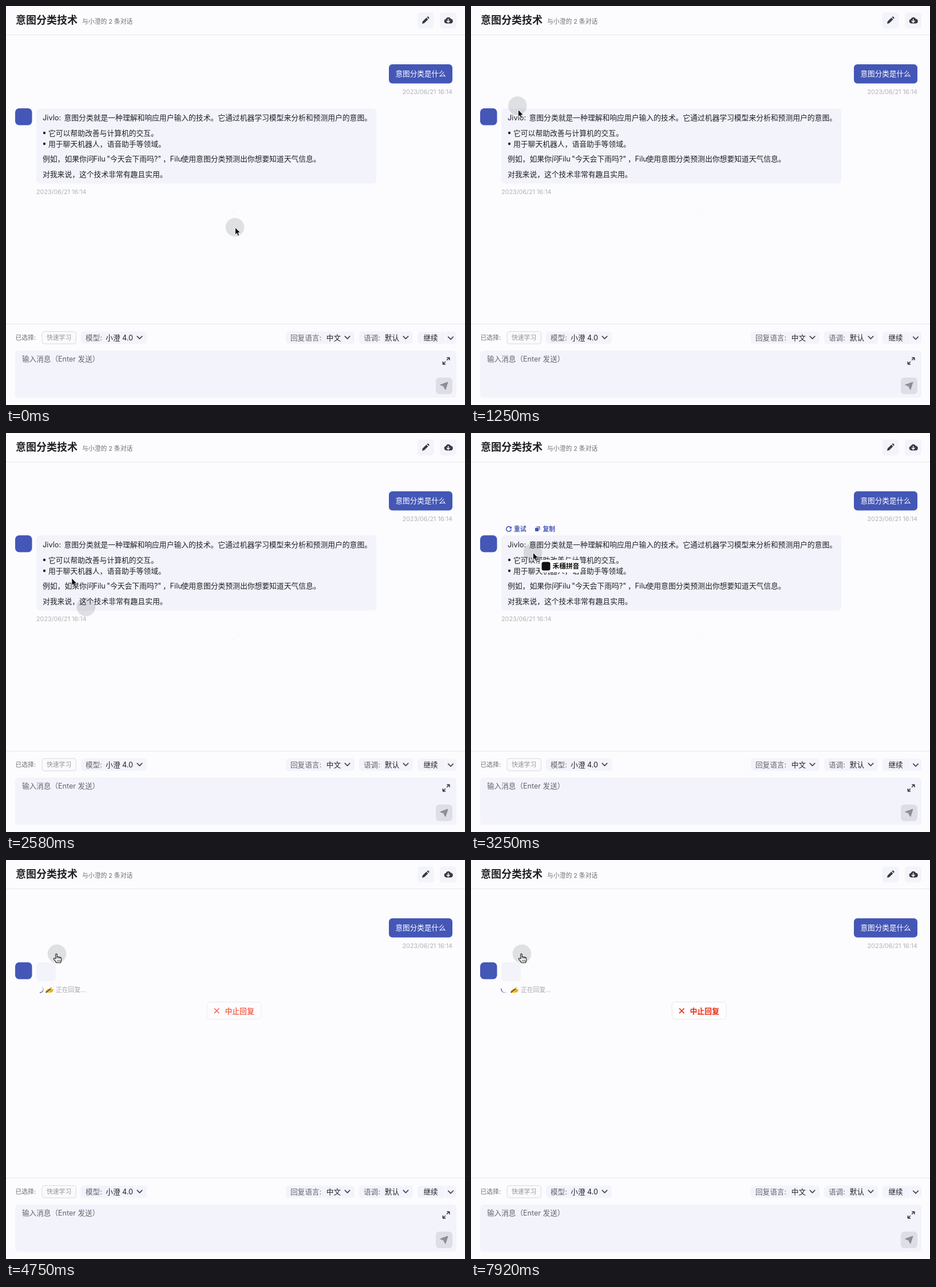
An HTML page for the animation above (8000 ms loop, 802 by 698 pixels).

```html
<!DOCTYPE html>
<html lang="zh-CN">
<head>
<meta charset="utf-8">
<title>对话</title>
<style>
html, body { margin: 0; width: 100%; height: 100%; overflow: hidden; background: #fcfcfe; }
svg { display: block; width: 100%; height: 100%; }
text { font: 12.6px Inter, "Noto Sans CJK SC", "Noto Sans CJK", sans-serif; fill: #1f2126; white-space: pre; }
.body { font-size: 12.8px; }
.small { font-size: 10.8px; fill: #6f7076; }
.date { fill: #b2b3b7; }
.label { fill: #64666c; }
.tool { font-weight: 600; fill: #4457b6; }
.soft { fill: #f3f3fb; }
.blue { fill: #4457b6; }
.line { fill: none; stroke-linecap: round; stroke-linejoin: round; }
</style>
</head>
<body>
<svg id="stage" viewBox="0 0 802 698">
  <defs>
    <path id="chevron" class="line" d="M-4.2 -2.2 0 2.2 4.2 -2.2" stroke="#4b4d53" stroke-width="1.8"/>
  </defs>

  <g id="header">
    <text x="17" y="31" style="font-size:18px;font-weight:600">意图分类技术</text>
    <text class="small" x="133" y="30.5">与小澄的 2 条对话</text>
    <rect class="soft" x="718.5" y="11" width="29" height="28.5" rx="6"/>
    <rect class="soft" x="758" y="11" width="29" height="28.5" rx="6"/>
    <path d="M727 31l.9-3.9 6.6-6.6 3 3-6.6 6.6zM735.4 19.6l.9-.9q.8-.7 1.6 0l1.4 1.4q.7.8 0 1.6l-.9.9z" fill="#36383e"/>
    <path d="M769.5 30.5h-.2a3.9 3.9 0 0 1-.5-7.7 4.3 4.3 0 0 1 8.2-.2 3.9 3.9 0 0 1-.4 7.9z" fill="#36383e"/>
    <path d="M772.7 23v5M770.3 26.2l2.4 2.4 2.4-2.4" class="line" stroke="#f3f3fb" stroke-width="1.5"/>
    <path d="M0 50.5H802M0 556.5H802" stroke="#e7e7ee"/>
  </g>

  <g id="question">
    <rect class="blue" x="669" y="102" width="111" height="33.5" rx="6"/>
    <text x="680.5" y="123" style="fill:#fff">意图分类是什么</text>
    <text class="small date" x="780" y="153.5" text-anchor="end">2023/06/21 16:14</text>
  </g>

  <rect class="blue" x="16" y="179" width="29.5" height="29.5" rx="7"/>

  <g id="answer">
    <rect class="soft" x="53" y="179" width="594" height="131.5" rx="6"/>
    <text class="body" x="64" y="200">Jivlo:<tspan x="101.5">意图分类就是一种理解和响应用户输入的技术。它通过机器学习模型来分析和预测用户的意图。</tspan></text>
    <circle cx="67" cy="222" r="2.2" fill="#1f2126"/>
    <text class="body" x="74" y="226.5">它可以帮助改善与计算机的交互。</text>
    <circle cx="67" cy="241" r="2.2" fill="#1f2126"/>
    <text class="body" x="74" y="245.5">用于聊天机器人，语音助手等领域。</text>
    <text class="body" x="64" y="272">例如，如果你问<tspan x="152.5">Filu</tspan><tspan x="176">"今天会下雨吗?"</tspan><tspan x="274">，</tspan><tspan x="286.5">Filu</tspan><tspan x="306.5">使用意图分类预测出你想要知道天气信息。</tspan></text>
    <text class="body" x="64" y="298.5">对我来说，这个技术非常有趣且实用。</text>
    <text class="small date" x="53" y="329">2023/06/21 16:14</text>
    <path d="M395 361.5h5" stroke="#f0f0f3"/>
  </g>

  <g id="tools">
    <path class="line" d="M69.6 165.6a4.3 4.3 0 1 0 .5 3.6" stroke="#4457b6" stroke-width="1.6"/>
    <path class="blue" d="M71 163.2v4h-4z"/>
    <text class="small tool" x="75" y="172">重试</text>
    <path class="blue" d="M114.5 163.5h6v6h-1.3v-4.7h-4.7z"/>
    <rect class="blue" x="112" y="165.8" width="6.3" height="6.3" rx="1"/>
    <text class="small tool" x="125.5" y="172">复制</text>
  </g>

  <g id="tip">
    <rect x="120" y="222" width="73" height="22" rx="3" fill="#fcfcfe"/>
    <rect x="123.5" y="225.5" width="15" height="15" rx="3.5" fill="#111"/>
    <text x="142.5" y="237" style="font-size:11.7px;font-weight:600;fill:#111">禾穗拼音</text>
  </g>

  <g id="pending">
    <rect class="soft" x="53" y="179" width="34" height="33" rx="6"/>
    <g id="spin" class="line" stroke="#4457b6" stroke-width="1.7"></g>
    <path d="M69 229.5q3.5-4.8 7.5-4.5l2.2-3q1.6-.4 1.4 1.2l-1.2 2.3 3.2.4q1.2 1 .2 2l-1.1 2.8q-3.5 2.5-7 1.4l-3.2.9z" fill="#f8bd2d"/>
    <path d="M69.5 231.8l8.5-6.6" stroke="#42454d" stroke-width="1.5"/>
    <path class="line" d="M77.5 227.3l4.5.4M77.2 229.5l4 .2" stroke="#d58b16" stroke-width=".7"/>
    <text class="small" x="87" y="231" style="fill:#a9aaae">正在回复...</text>
  </g>

  <g id="stop">
    <rect x="351" y="248.5" width="95" height="30" rx="5.5" fill="#fdfdfe" stroke="#e7e7ec"/>
    <path class="line" d="M364.4 260l7.6 7.6M372 260l-7.6 7.6" stroke="#f2290f" stroke-width="1.7"/>
    <text x="382.5" y="268.5" style="font-size:12.8px;font-weight:600;fill:#f2290f">中止回复</text>
  </g>

  <g id="footer">
    <text class="small" x="16.5" y="584">已选择:</text>
    <rect x="63" y="569.5" width="59.5" height="21.5" rx="4" fill="#fafafd" stroke="#d9dadf"/>
    <text class="small" x="71" y="584" style="fill:#929398">快速学习</text>
    <g id="fields"></g>
    <rect class="soft" x="719" y="570" width="68" height="21" rx="5"/>
    <path d="M767.5 570v21" stroke="#fcfcfe"/>
    <text x="729.5" y="585" style="font-weight:500">继续</text>
    <use href="#chevron" x="777" y="581"/>
    <rect class="soft" x="16" y="603" width="771" height="82.5" rx="6"/>
    <text class="label" x="28" y="622">输入消息（Enter 发送）</text>
    <path class="line" d="M770.5 619.3l4-4M770.8 615.2h4v4M767.5 622.5l-4 4M763.4 622.6v4h4" stroke="#36383e" stroke-width="1.6"/>
    <rect x="751" y="650" width="29" height="29" rx="6" fill="#dedfe6"/>
    <path d="M772 658l-4.2 13.2-3.1-5.4 3.6-4-4.8 3-4.8-2z" fill="#8b8d94" stroke="#8b8d94" stroke-linejoin="round"/>
  </g>

  <circle id="ring" r="16.3" fill="#1c1f23" fill-opacity=".13"/>
  <path id="arrow" d="M.5 .5V13L3.3 10.4 5.2 15 7.5 14 5.6 9.6H9.4z" fill="#000" stroke="#fff" stroke-width=".8"/>
  <g id="hand" class="line" stroke="#111" stroke-width="1.1">
    <path fill="#fff" d="M-2.2 8.2V1.2Q-2.2 0-1 0T.2 1.2V5.6Q1.4 4.7 2.8 5.8 4.2 5.2 5.2 6.5 7.6 6 7.8 8.4V10.5Q7.6 13 6.4 15.8H-.7Q-2 13-5.5 9.6-6.2 8.2-4.8 7.7-3.5 7.5-2.2 9z"/>
    <path d="M.2 5.6V8.2M2.8 5.8V8.4M5.2 6.5V8.8M1 11v2.6M3.2 11v2.6M5.3 11v2.6" stroke-width=".8"/>
  </g>
</svg>
<script>
const $ = id => document.getElementById(id);
const LOOP = 8000, STEP = 1000 / 12, SENT = 4660;

const clamp = v => Math.max(0, Math.min(1, v));
const linear = p => p;
const smooth = p => p * p * (3 - 2 * p);
const easeOut = p => 1 - (1 - p) ** 3;

// pointer glides: start, end, easing, then two Bezier handles and the goal
const home = [400, 387];
const glides = [
  [83, 1186, linear, [560, 390], [60, 50], [82, 181]],
  [1333, 1667, smooth, [90, 230], [150, 270], [191, 281]],
  [1833, 2250, smooth, [240, 285], [330, 400], [356, 530]],
  [2333, 2917, easeOut, [200, 400], [100, 280], [108, 209]],
  [3333, 3833, smooth, [105, 190], [92, 166], [89, 164]]
];

function pointer(t) {
  let from = home;
  for (const [start, end, ease, h1, h2, goal] of glides) {
    if (t < start) break;
    const s = ease(clamp((t - start) / (end - start))), r = 1 - s;
    from = from.map((v, i) =>
      r * r * r * v + 3 * r * r * s * h1[i] + 3 * r * s * s * h2[i] + s * s * s * goal[i]);
  }
  return from;
}

function addField(x, width, label, value) {
  const right = x + width;
  $('fields').innerHTML += `
    <rect class="soft" x="${x}" y="569.5" width="${width}" height="21.5" rx="5"/>
    <text class="label" x="${x + 8}" y="584.5">${label}</text>
    <text x="${right - 24}" y="584.5" text-anchor="end">${value}</text>
    <use href="#chevron" x="${right - 12.5}" y="580"/>`;
}
addField(131, 115, '模型:', '小澄 4.0');
addField(489, 120, '回复语言:', '中文');
addField(617, 94, '语调:', '默认');

// arc that fades towards its tail
const polar = a => [6 * Math.cos(a), 6 * Math.sin(a)].map(v => v.toFixed(2)).join(' ');
const PIECES = 10, SPAN = 2.4;
for (let i = 0; i < PIECES; i++) {
  const a = -SPAN * i / PIECES, b = a - SPAN / PIECES;
  $('spin').innerHTML += `<path stroke-linecap="butt" d="M${polar(b)}A6 6 0 0 1 ${polar(a)}" opacity="${1 - i / PIECES}"/>`;
}

const fade = (id, v) => $(id).setAttribute('opacity', clamp(v));
const move = (id, [x, y], turn = 0) =>
  $(id).setAttribute('transform', `translate(${x} ${y}) rotate(${turn})`);

function draw(time) {
  const t = Math.floor(time / STEP + 0.03) * STEP;
  const tip = pointer(t);
  const onTool = t > 3700, sent = t > SENT;
  move('ring', pointer(t - STEP)); // trails one step behind
  move('arrow', tip);
  move('hand', tip);
  fade('arrow', onTool ? 0 : 1);
  fade('hand', onTool ? 1 : 0);

  const shown = clamp((t - 3083) / 166);
  fade('tools', sent ? 0 : shown);
  fade('tip', Math.min(shown, (4250 - t) / 166));
  fade('answer', sent ? 0 : 1);
  fade('pending', sent ? 1 : 0);
  fade('stop', sent ? (t - 4583) / 250 : 0);
  move('spin', [59, 226], 10 + (t - 6417) / 600 * 360);
}

function tick(now) {
  draw(now % LOOP);
  requestAnimationFrame(tick);
}
draw(0);
requestAnimationFrame(tick);
</script>
</body>
</html>
```
